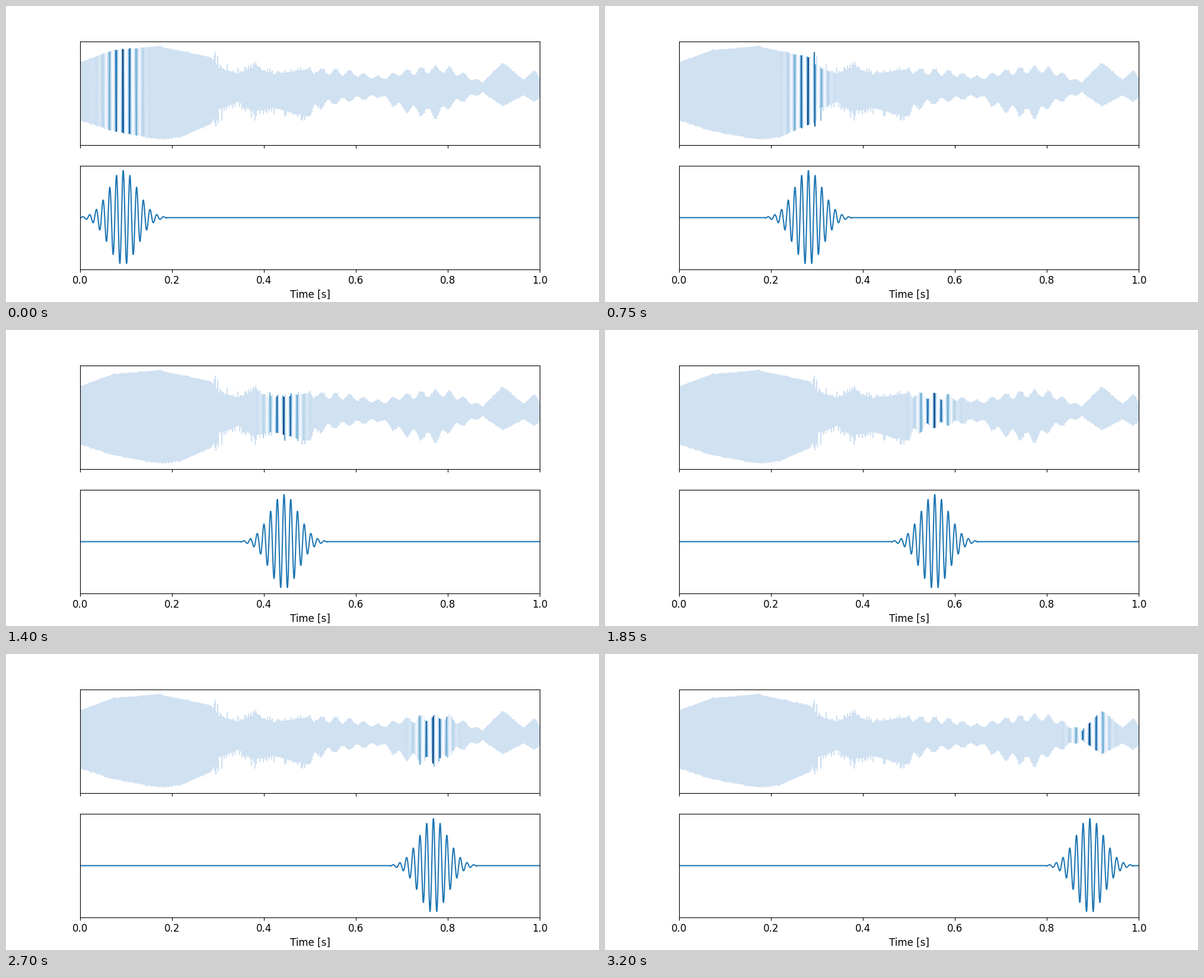
Animation of 1000 by 500 pixels, one loop 3.25 s. Source, as a matplotlib script:

```python
import numpy as np
import matplotlib.pyplot as plt
from matplotlib.animation import FuncAnimation
from matplotlib.collections import LineCollection

FRAMES, INTERVAL = 65, 50
STEP = 0.0125            # wavelet shift per frame, in seconds
HALF = 0.09375           # half width of the wavelet window
SIGMA = HALF / 3
PERIOD = 0.01465
STROKES = 775            # half cycles of the sound, one per pixel column
REST = 137.5             # rest line of the sound, measured downwards
BEAT = 0.031             # period of the swelling in the second half

# Broad loudness of the sound: time, reach above and below the rest line
LOUDNESS = [(0, 42, 55), (0.07, 62, 73), (0.17, 69, 87), (0.22, 61, 83),
            (0.285, 50, 61), (0.302, 32, 36), (0.345, 23, 24), (0.376, 34, 40),
            (0.42, 22, 34), (0.495, 30, 49), (0.52, 26, 28), (0.58, 24, 20),
            (0.655, 15, 14), (0.70, 24, 34), (0.78, 30, 44), (0.81, 27, 26),
            (0.876, 8, 8), (0.92, 41, 31), (0.965, 12, 13), (0.988, 29, 24),
            (1, 16, 16)]


def make_sound(t):
    """Zigzag between the upper and the lower outline."""
    rng = np.random.default_rng(7)
    key, up, down = np.transpose(LOUDNESS)
    reach = np.where(np.arange(t.size) % 2, np.interp(t, key, down), -np.interp(t, key, up))
    rough = np.where(t < 0.29, 0.03, 0.1 + 0.8 * np.exp(-(t - 0.29) / 0.1))
    beats = np.where((t > 0.5) & (t < 0.88), 0.2 * np.cos(2 * np.pi * (t - 0.525) / BEAT), 0)
    return REST + reach * (1 + beats) * (1 + rough * rng.random(t.size)**3)


def wavelet(t, frame):
    u = t - HALF - frame * STEP
    wave = np.exp(-u**2 / (2 * SIGMA**2)) * np.cos(2 * np.pi * u / PERIOD)
    return np.where(np.abs(u) <= HALF, wave, 0)


plt.rcParams.update({"font.family": "DejaVu Sans", "font.size": 12})
fig, (ax_sound, ax_wave) = plt.subplots(2, 1, sharex=True, figsize=(10, 5), dpi=100)

ticks = np.linspace(0, 1, STROKES + 1)
middles = (ticks[:-1] + ticks[1:]) / 2
points = np.column_stack([ticks, make_sound(ticks)])
sound = LineCollection(np.stack([points[:-1], points[1:]], axis=1),
                       cmap="Blues", linewidths=1.5)
sound.set_clim(-0.25, 1)
ax_sound.add_collection(sound)
ax_sound.set_ylim(235, 60)

time = np.linspace(0, 1, 4001)
line, = ax_wave.plot(time, wavelet(time, 0), color="C0", lw=1.5)
ax_wave.set_ylim(-1.1, 1.1)
ax_wave.set_xlim(0, 1)
ax_wave.set_xlabel("Time [s]")
for ax in (ax_sound, ax_wave):
    ax.set_yticks([])


def update(frame):
    weight = wavelet(middles, frame)
    sound.set_array(weight * np.abs(weight))
    line.set_ydata(wavelet(time, frame))
    return sound, line


anim = FuncAnimation(fig, update, frames=FRAMES, init_func=lambda: update(0),
                     interval=INTERVAL, repeat=True, repeat_delay=0)
plt.show()
```
